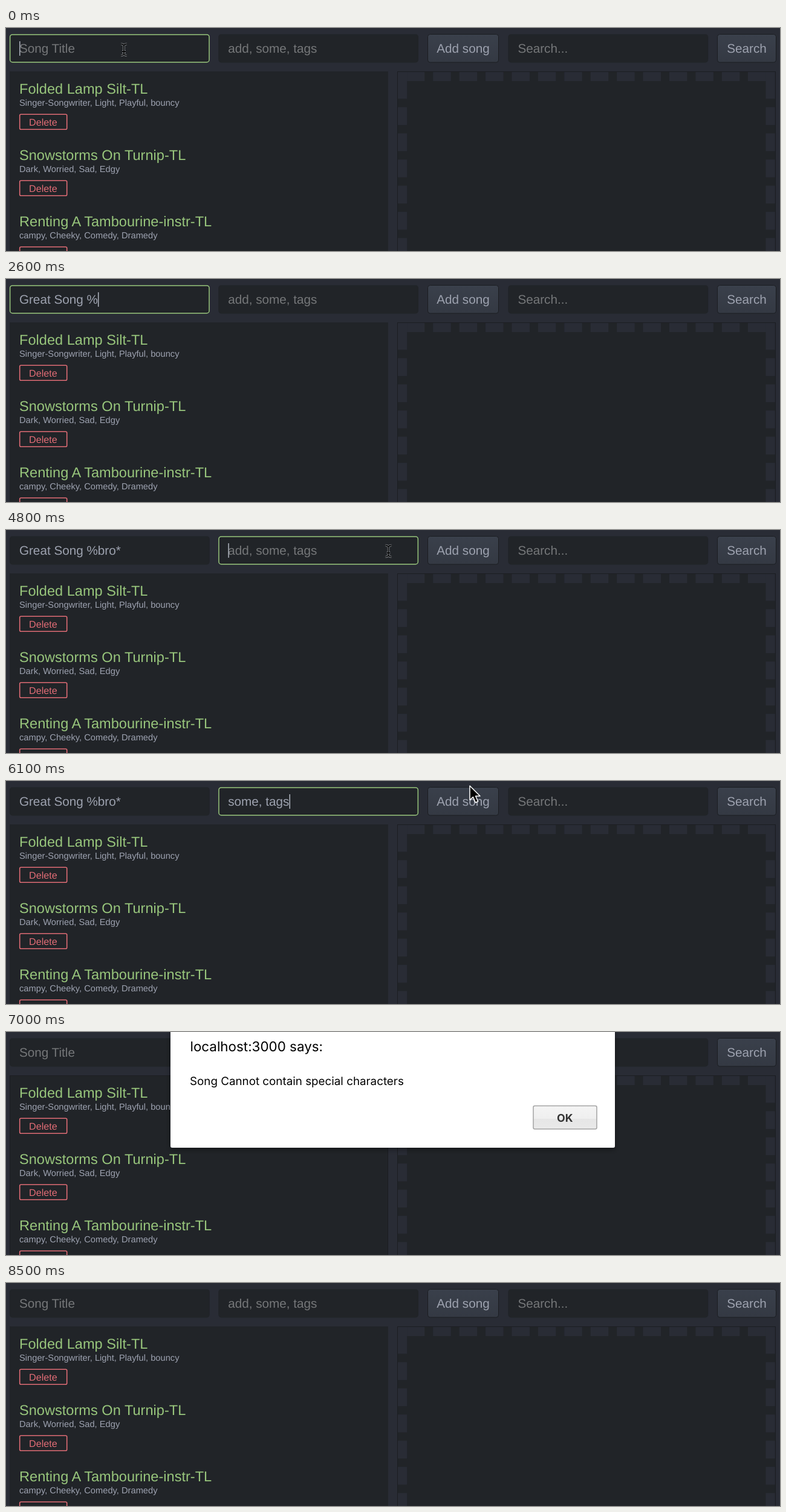
Write an HTML page that moves like this. It is 1280 px wide and 370 px high and loops after 8.7 s.

```html
<!DOCTYPE html>
<html lang="en">
<head>
<meta charset="utf-8">
<title>Song list</title>
<style>
  html, body { margin: 0; width: 100%; height: 100%; overflow: hidden; background: #292c35; }
  svg { display: block; width: 1280px; height: 370px; }
  text { font-family: "Liberation Sans", Arial, sans-serif; white-space: pre; text-rendering: geometricPrecision; }
  .field { font-size: 20.7px; fill: #9da2af; }
  .hint { fill: #757779; }
  .title { font-size: 23.6px; fill: #98c67c; }
  .tags { font-size: 14.7px; fill: #9da2b0; }
  .delete { font-size: 16.2px; fill: #e06c75; }
  #dialog text { font-family: Inter, "Open Sans", sans-serif; fill: #000; }
</style>
</head>
<body>
<svg id="stage" viewBox="0 0 1280 370" xmlns="http://www.w3.org/2000/svg">
  <defs>
    <linearGradient id="button" x2="0" y2="1">
      <stop stop-color="#3a404b"/><stop offset="1" stop-color="#343943"/>
    </linearGradient>
    <linearGradient id="okFace" x2="0" y2="1">
      <stop stop-color="#f4f4f4"/><stop offset=".55" stop-color="#efefef"/>
      <stop offset=".56" stop-color="#e6e6e6"/><stop offset="1" stop-color="#e9e9e9"/>
    </linearGradient>
    <filter id="shadow" x="-5%" y="-5%" width="110%" height="120%">
      <feDropShadow dx="0" dy="3" stdDeviation="5" flood-opacity=".4"/>
    </filter>
    <path id="beamShape" d="M-5-9.5Q0-9.5 0-6Q0-9.5 5-9.5M0-6V6M-5 9.5Q0 9.5 0 6Q0 9.5 5 9.5M-3 3H3"/>
  </defs>
  <rect width="1280" height="370" fill="#292c35"/>
  <g id="page"></g>
  <g id="dialog">
    <path id="sheet"/>
    <text id="ghost" x="708.5" y="42" font-size="22.7" style="font-family:'Liberation Sans',sans-serif;fill:#fff">Add song</text>
    <g id="message">
      <text x="304.5" y="32" font-size="22.4">localhost:3000 says:</text>
      <text x="304" y="88" font-size="18.8">Song Cannot contain special characters</text>
      <rect id="ok" x="872" y="122.5" width="105" height="38.5" rx="2.5" stroke="#a3a3a3" stroke-width="1.5"/>
      <text x="924.3" y="149" font-size="17.8" font-weight="700" text-anchor="middle" id="okText">OK</text>
    </g>
  </g>
  <path id="arrow" d="M0 0V23.5L5.4 18.6L9.4 27.8L13.6 26L9.6 17H17Z" fill="#000" stroke="#fff" stroke-width="1.5" stroke-linejoin="round"/>
  <g id="beam" fill="none">
    <use href="#beamShape" stroke="#8d9094" stroke-width="3.4"/>
    <use href="#beamShape" stroke="#08090a" stroke-width="1.8"/>
  </g>
</svg>
<script>
const LOOP = 8700, STEP = 100;
const PANEL = '#212428', BACK = '#292c35', GREEN = '#98c67c', EDGE = '#1b1d21';
const $ = id => document.getElementById(id);
const page = $('page');

function add(tag, attrs, content = '') {
  const el = document.createElementNS('http://www.w3.org/2000/svg', tag);
  for (const key in attrs) el.setAttribute(key, attrs[key]);
  el.textContent = content;
  page.append(el);
  return el;
}
const box = (x, y, width, height, fill, more = {}) => add('rect', { x, y, width, height, fill, ...more });
const label = (x, y, cls, content) => add('text', { x, y, class: cls }, content);
const show = (el, on) => el.setAttribute('visibility', on ? 'visible' : 'hidden');

function makeField(x, hint) {
  return {
    x, hint,
    frame: box(x + .75, 10.9, 329.4, 45.8, PANEL, { rx: 4, 'stroke-width': 1.5 }),
    text: label(x + 16, 41, 'field hint', hint),
    caret: box(x + 16, 22, 1.4, 24, '#b9bec9'),
  };
}

function setField(field, value, focused) {
  field.text.textContent = value || field.hint;
  field.text.setAttribute('class', value ? 'field' : 'field hint');
  field.frame.setAttribute('stroke', focused ? GREEN : PANEL);
  show(field.caret, focused);
  const width = value ? field.text.getComputedTextLength() : 0;
  field.caret.setAttribute('x', field.x + 16.2 + width);
}

function makeButton(x, width, content) {
  box(x + .5, 10.5, width - 1, 46.5, 'url(#button)', { rx: 4, stroke: EDGE });
  label(x + width / 2, 41, 'field', content).setAttribute('text-anchor', 'middle');
}

const titleField = makeField(5.9, 'Song Title');
const tagsField = makeField(351.2, 'add, some, tags');
const searchField = makeField(830.4, 'Search...');
makeButton(697, 118, 'Add song');
makeButton(1176, 98, 'Search');

const listPanel = box(6.5, 72.5, 625, 310, PANEL, { stroke: PANEL });
[
  ['Folded Lamp Silt-TL', 'Singer-Songwriter, Light, Playful, bouncy'],
  ['Snowstorms On Turnip-TL', 'Dark, Worried, Sad, Edgy'],
  ['Renting A Tambourine-instr-TL', 'campy, Cheeky, Comedy, Dramedy'],
].forEach(([title, tags], i) => {
  const y = i * 110;
  label(22, 109 + y, 'title', title);
  label(22, 129.3 + y, 'tags', tags);
  box(22.7, 143.2 + y, 78, 25, 'none', { rx: 2, stroke: '#e06c75', 'stroke-width': 1.6 });
  label(38, 161.7 + y, 'delete', 'Delete');
});

// Drop zone with a thick dashed border
box(647.5, 72.5, 625, 310, PANEL, { stroke: EDGE });
const PERIOD = 43.42, DASH = 29.5;
for (const x of [648, 1227]) box(x, 73, 44.3, 15, BACK);
for (const x of [648, 1256.5]) box(x, 73, 15.2, 44.3, BACK);
for (let i = 0; i < 12; i++) box(706.2 + i * PERIOD, 73, DASH, 15, BACK);
for (let i = 0; i < 6; i++)
  for (const x of [648, 1256.5]) box(x, 131.4 + i * PERIOD, 15.2, DASH, BACK);

const TITLE = 'Great Song %bro*';
const TITLE_KEYS = [200, 600, 700, 900, 1200, 1400, 1600, 1800, 1900, 2100, 2300, 2600, 2900, 3100, 3300, 3700];
const TAGS = 'some, tags';
const FOCUS_TAGS = 4800, TAGS_START = 5100, ALERT = 6900, CLOSE = 8200, GONE = 8500;

// Each stretch of visible pointer: [time, x, y] stops, the last one hides it
const POINTER = [
  [[0, 195, 36], [200, 195, 36]],
  [[4000, 195, 36], [4200, 420, 22], [4400, 740, 4], [4500, 885, 24], [4700, 690, 34], [4900, 575, 36], [5100, 575, 36]],
  [[6100, 767, 8], [6400, 757, 32], [6900, 757, 34]],
  [[7200, 757, 40], [7500, 870, 110], [7800, 945, 143], [GONE, 945, 143]],
];

function pointerAt(t) {
  const stops = POINTER.find(s => t >= s[0][0] && t < s[s.length - 1][0]);
  if (!stops) return null;
  const i = stops.findIndex(s => s[0] > t);
  const [t0, x0, y0] = stops[i - 1], [t1, x1, y1] = stops[i];
  const k = (t - t0) / (t1 - t0);
  return { x: x0 + (x1 - x0) * k, y: y0 + (y1 - y0) * k };
}

function drawPointer(t) {
  const p = pointerAt(t);
  const overField = p && t < ALERT && p.y > 10 && p.y < 57 &&
    [titleField, tagsField, searchField].some(f => p.x > f.x && p.x < f.x + 331);
  show($('arrow'), p && !overField);
  show($('beam'), overField);
  if (p) for (const id of ['arrow', 'beam'])
    $(id).setAttribute('transform', `translate(${p.x} ${p.y})`);
}

function drawDialog(t) {
  const open = t >= ALERT && t < GONE, closing = t >= CLOSE, pressed = t >= 8000;
  $('dialog').style.display = open ? '' : 'none';
  listPanel.setAttribute('stroke', open ? EDGE : PANEL);
  if (!open) return;
  const opacity = t < ALERT + STEP ? .7 : closing ? 1 - (t - CLOSE) / STEP * .45 : 1;
  $('dialog').setAttribute('opacity', opacity);
  $('sheet').setAttribute('d', closing
    ? 'M273-5H1005V68L1006 150H1007V187Q1007 190 1004 190H275Q272 190 272 187V150L273 68Z'
    : 'M272-5H1007V189Q1007 192 1004 192H275Q272 192 272 189Z');
  $('sheet').setAttribute('fill', closing ? '#f0f0f0' : '#fff');
  if (closing) $('sheet').removeAttribute('filter');
  else $('sheet').setAttribute('filter', 'url(#shadow)');
  $('ghost').style.display = closing ? '' : 'none';
  $('message').setAttribute('transform', `translate(0 ${closing ? -2 : 0})`);
  $('ok').setAttribute('fill', pressed ? '#dfdfdf' : 'url(#okFace)');
  $('okText').style.fill = pressed ? '#000' : '#333';
}

function draw(now) {
  const t = Math.floor(now % LOOP / STEP) * STEP;
  const sent = t >= ALERT;
  const titleCount = TITLE_KEYS.filter(k => k <= t).length;
  const tagCount = Math.max(0, Math.floor((t - TAGS_START) / STEP) + 1);
  setField(titleField, sent ? '' : TITLE.slice(0, titleCount), t < FOCUS_TAGS);
  setField(tagsField, sent ? '' : TAGS.slice(0, tagCount), t >= FOCUS_TAGS && !sent);
  setField(searchField, '', false);
  drawDialog(t);
  drawPointer(t);
}

const start = performance.now();
function tick() {
  draw(performance.now() - start);
  requestAnimationFrame(tick);
}
tick();
</script>
</body>
</html>
```
